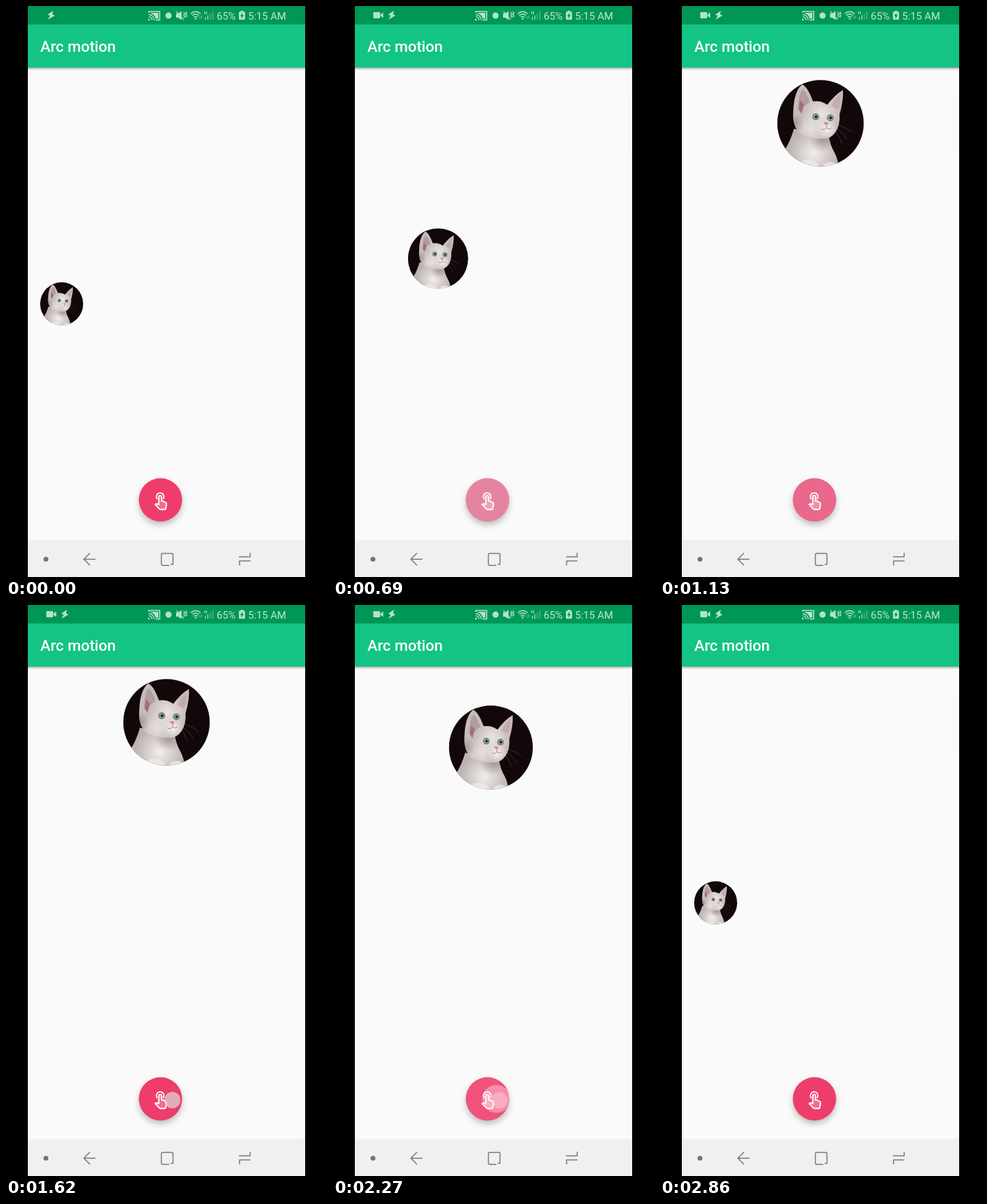
Recreate the animation shown at these times as an HTML page with a canvas. Size 470 px wide and 835 px high, loop 2.92 s.

```html
<!DOCTYPE html>
<html lang="en">
<head>
<meta charset="utf-8">
<title>Arc motion</title>
<style>
  html, body { margin: 0; width: 100%; height: 100%; overflow: hidden; background: #000; }
  canvas, svg { position: absolute; left: 0; top: 0; display: block; }
  text { font-family: Roboto, sans-serif; }
  .title { font-size: 22.4px; font-weight: 500; fill: #fff; }
  .status { font-size: 15px; fill: #bfe5d5; }
</style>
</head>
<body>
<canvas id="stage" width="470" height="835"></canvas>
<svg width="470" height="835">
  <text class="title" x="50.3" y="67">Arc motion</text>
  <text class="status" x="308.5" y="19.7">65%</text>
  <text class="status" x="354.5" y="19.7">5:15 AM</text>
</svg>
<script>
const ctx = document.getElementById('stage').getContext('2d');
const LOOP = 2920;
const TAU = Math.PI * 2;
const ICON = '#b3e1cd';

const TICKS = [0, 90, 150, 210, 280, 540, 620, 690, 760, 820, 880, 950, 1010,
  1070, 1140, 1200, 1270, 1340, 1400, 1620, 2150, 2210, 2270, 2330, 2400,
  2460, 2530, 2590, 2660, 2720, 2790, 2860];

const FAB = { x: 226.2, y: 722.2, r: 31.7 };
const TOUCH = { x: 243.5, y: 724, r: 12 };
const REST = { x: 81.5, y: 435.5, r: 31.5 };
const TOP = { x: 235, y: 171.5, r: 63.3 };
const MOVE = { out: 614, back: 2217, span: 267 };

const RIPPLES = [
  { start: 540, full: 690, fade: 850, end: 1380, tint: '216,225,230' },
  { start: 2210, full: 2440, fade: 2430, end: 2800, tint: '255,255,255' }
];
const TOUCHES = [[280, 620], [1620, 2330]];

const clamp = v => Math.max(0, Math.min(1, v));
const ramp = (t, a, b) => clamp((t - a) / (b - a));
const mix = (a, b, p) => a + (b - a) * p;
const cubic = (a, b, c, d, p) => {
  const q = 1 - p;
  return q * q * q * a + 3 * q * q * p * b + 3 * q * p * p * c + p * p * p * d;
};

// Fast out, slow in: cubic-bezier(.4, 0, .2, 1)
function ease(u) {
  let lo = 0, hi = 1;
  for (let i = 0; i < 20; i++) {
    const m = (lo + hi) / 2;
    if (cubic(0, 0.4, 0.2, 1, m) < u) lo = m; else hi = m;
  }
  return cubic(0, 0, 1, 1, lo);
}

function circle(x, y, r, fill) {
  ctx.beginPath();
  ctx.arc(x, y, r, 0, TAU);
  ctx.fillStyle = fill;
  ctx.fill();
}

function box(x, y, w, h, fill) {
  ctx.fillStyle = fill;
  ctx.fillRect(x, y, w, h);
}

function fillPath(d, fill) {
  ctx.fillStyle = fill;
  ctx.fill(new Path2D(d));
}

function strokePath(d, color, width) {
  ctx.strokeStyle = color;
  ctx.lineWidth = width;
  ctx.stroke(new Path2D(d));
}

function glow(x, y, r, rgb, alpha) {
  const soft = ctx.createRadialGradient(x, y, 0, x, y, r);
  soft.addColorStop(0, `rgba(${rgb},${alpha})`);
  soft.addColorStop(1, `rgba(${rgb},0)`);
  circle(x, y, r, soft);
}

function drawBars() {
  box(0, 0, 470, 835, '#000');
  box(32, 0, 406, 835, '#fafafa');
  box(432.5, 135, 1, 82, '#f3f3f3');

  const shade = ctx.createLinearGradient(0, 90, 0, 94);
  shade.addColorStop(0, 'rgba(0,0,0,.3)');
  shade.addColorStop(1, 'rgba(0,0,0,0)');
  box(32, 90, 406, 4, shade);
  box(32, 27, 406, 63, '#13c484');
  box(32, 0, 406, 27, '#009656');

  box(32, 781, 406, 54, '#f0f0f0');
  circle(58.5, 809, 3.6, '#747474');
  ctx.lineJoin = 'round';
  strokePath('M131 809H114.5M123 800L114 809L123 818', '#777', 1.5);
  strokePath('M239 818H229.5Q227.5 818 227.5 816V802.5Q227.5 800.5 229.5 800.5H242.5Q244.5 800.5 244.5 802.5V816.5H241', '#777', 1.5);
  strokePath('M341 805.5H357.5V799.5M358 811.5H342V818', '#777', 1.5);
}

function drawStatus(t) {
  const shift = ramp(t, 60, 230);
  ctx.save();
  ctx.globalAlpha = shift;
  fillPath('M60 9H68Q69 9 69 10V17Q69 18 68 18H60Q59 18 59 17V10Q59 9 60 9ZM69.5 12.5L73.5 9.5V17.5L69.5 14.5Z', ICON);
  ctx.restore();

  ctx.save();
  ctx.translate(20 * shift, 0);
  fillPath('M69 7L61 12.5L64.5 14.5L61 20L71.5 14L68 12Z', ICON);
  ctx.restore();

  // Screen cast
  strokePath('M209 10V8H225V20.5H219', ICON, 1.6);
  strokePath('M209 12.5A8.5 8.5 0 0 1 217 20.8M209 15.8A5 5 0 0 1 213.8 20.8', ICON, 1.5);
  fillPath('M208 18.5A3 3 0 0 1 211 21H208ZM212 10H223V18.5H219Q217.5 12 212 11Z', ICON);
  circle(238, 14, 4.5, ICON);

  // Muted speaker
  fillPath('M249 11H252L257 7.5V20.5L252 17H249Z', ICON);
  strokePath('M249.5 8L260 20M260 9L262 11L260 13L262 15L260 17M263 8.5L265 10.5L263 12.5L265 14.5L263 16.5', ICON, 1.2);

  // Wireless
  strokePath('M270.5 11.5Q277.5 5 285 11.5M272.8 14Q277.5 9.5 282.6 14M275 16.5Q277.5 14 280.5 16.5', ICON, 1.4);
  circle(277.7, 18.6, 1.3, ICON);
  strokePath('M284 15V19M286.5 14V18', 'rgba(179,225,205,.65)', 1);

  // Signal
  strokePath('M291 8V12M293.5 8V12M292 16V20M295.5 13.5V20', ICON, 1.2);
  strokePath('M299 11V20M303 8V20', 'rgba(179,225,205,.5)', 1.3);

  // Battery
  fillPath('M343.5 7H347.5V8.5H349Q350 8.5 350 9.5V19Q350 20 349 20H342Q341 20 341 19V9.5Q341 8.5 342 8.5H343.5Z', ICON);
  fillPath('M346.5 9.5L342.8 15H345L344.3 19L348.2 13.3H346Z', '#009656');
}

// Simple kitten portrait, modelled around a radius of 63.5.
function drawKitten({ x, y, r }) {
  ctx.save();
  ctx.translate(x, y);
  ctx.scale(r / 63.5, r / 63.5);
  ctx.beginPath();
  ctx.arc(0, 0, 63.5, 0, TAU);
  ctx.clip();
  box(-64, -64, 128, 128, '#12080a');

  // Body
  ctx.save();
  const body = new Path2D('M-39 8Q-44 26 -53 40L-50 66H26Q27 56 21 44Q14 32 12 18Z');
  ctx.clip(body);
  box(-64, 0, 128, 66, '#bdb4b1');
  glow(-10, 44, 36, '245,241,239', 0.95);
  glow(3, 22, 20, '120,108,106', 0.55);
  fillPath('M-36 66Q-30 50 -12 54Q-4 56 -1 66ZM2 66Q8 52 23 59V66Z', 'rgba(240,235,232,.8)');
  ctx.restore();

  // Head
  ctx.save();
  const head = new Path2D('M-40 -18Q-39 -47 -27 -57Q-19 -54 -11 -32Q0 -34 10 -27Q21 -42 33 -49Q34 -34 28 -13Q29 3 22 13Q15 23 4 23Q-14 23 -29 16Q-42 5 -40 -18Z');
  ctx.clip(head);
  box(-64, -64, 128, 128, '#c6bdba');
  glow(2, -14, 27, '238,234,231', 0.9);
  glow(-14, 8, 24, '236,231,228', 0.85);
  glow(10, 9, 15, '250,246,244', 0.9);
  glow(-40, 0, 16, '120,110,108', 0.5);
  fillPath('M-33 -19Q-33 -42 -26 -50Q-20 -44 -16 -31Z', '#b39c9d');
  fillPath('M-32 -20L-30 -34L-24 -27L-28 -14Z', '#a2717a');
  fillPath('M16 -26Q24 -39 30 -43Q29 -29 25 -20Z', '#c3abab');
  ctx.restore();

  for (const [ex, ey] of [[-7, -9.5], [14.5, -8]]) {
    circle(ex, ey, 5, '#796f6d');
    circle(ex, ey, 3.8, '#7fa49f');
    circle(ex + 0.5, ey, 2, '#182326');
  }
  fillPath('M4 -1Q9 -3 12 0L9 4Z', '#d98e98');
  strokePath('M9 4V7Q5 11 1 8M9 7Q13 10 16 7', '#9b8985', 1);
  strokePath('M18 4Q32 11 39 24M19 2Q36 4 46 13M17 7Q27 16 31 29', 'rgba(205,195,193,.4)', 0.6);
  ctx.restore();
}

function kittenPose(t) {
  const p = t < 1500
    ? ease(ramp(t, MOVE.out, MOVE.out + MOVE.span))
    : 1 - ease(ramp(t, MOVE.back, MOVE.back + MOVE.span));
  const dx = TOP.x - REST.x, dy = REST.y - TOP.y;
  const bendY = TOP.y + (dx * dx + dy * dy) / (2 * dy);
  const grow = p + p * (1 - p) * (0.13 + 0.57 * p);
  return {
    x: cubic(REST.x, (REST.x + TOP.x) / 2, TOP.x, TOP.x, p),
    y: cubic(REST.y, (REST.y + bendY) / 2, (bendY + TOP.y) / 2, TOP.y, p),
    r: mix(REST.r, TOP.r, grow)
  };
}

function drawRipple(t, { start, full, fade, end, tint }) {
  if (t < start || t >= end) return;
  const p = ramp(t, start, full);
  const left = 1 - ramp(t, fade, end);
  const paint = a => `rgba(${tint},${a * left})`;
  circle(FAB.x, FAB.y, FAB.r, paint(0.12 * clamp(p * 3.5)));
  circle(TOUCH.x - 17 * p, FAB.y, 10 + 40 * p, paint(0.35));
}

function drawButton(t) {
  const { x, y, r } = FAB;
  ctx.save();
  ctx.shadowColor = 'rgba(0,0,0,.24)';
  ctx.shadowBlur = 9;
  ctx.shadowOffsetY = 5;
  circle(x, y, r, '#ee3d6b');
  ctx.restore();

  ctx.save();
  ctx.beginPath();
  ctx.arc(x, y, r, 0, TAU);
  ctx.clip();
  RIPPLES.forEach(ripple => drawRipple(t, ripple));
  ctx.translate(x, y + 2);
  const hand = 'M-2.5 -6.5Q-2.5 -8.6 -.5 -8.6Q1.5 -8.6 1.5 -6.5V-.5H3L8 2.2Q9 2.8 8.8 4L7.8 10.5Q7.5 12 6 12H0Q-1 12 -1.8 11.2L-7.8 5L-6.4 3.8L-2.5 4.8Z';
  fillPath(hand, 'rgba(255,255,255,.25)');
  strokePath(hand, '#fff', 1.9);
  strokePath('M-4.5 -3.2A5.4 5.4 0 1 1 3.5 -3.2', '#fff', 1.9);
  ctx.restore();

  if (TOUCHES.some(([from, to]) => t >= from && t < to)) {
    const pressed = RIPPLES.some(q => t >= q.start && t < q.end);
    circle(TOUCH.x, TOUCH.y, TOUCH.r, pressed ? 'rgba(255,225,232,.38)' : 'rgba(222,214,216,.72)');
  }
}

function draw(t) {
  drawBars();
  drawStatus(t);
  drawKitten(kittenPose(t));
  drawButton(t);
}

const begin = performance.now();
function frame() {
  const now = (performance.now() - begin) % LOOP;
  draw(TICKS.findLast(tick => tick <= now));
  requestAnimationFrame(frame);
}
frame();
</script>
</body>
</html>
```
